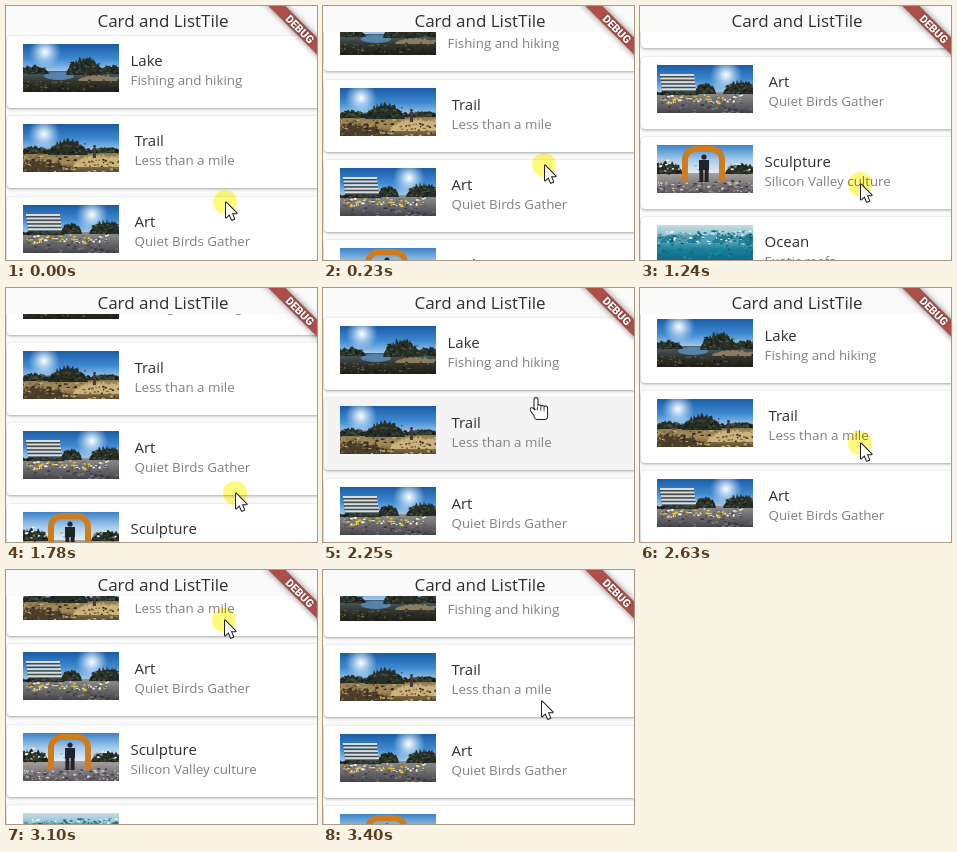
Animation, 311 px wide and 254 px high, one loop 3480 ms. Source, as an HTML page with a canvas:

```html
<!DOCTYPE html>
<html lang="en">
<head>
<meta charset="utf-8">
<title>Card and ListTile</title>
<style>
html, body { margin: 0; width: 100%; height: 100%; overflow: hidden; background: #fafafa; }
canvas { display: block; width: 311px; height: 254px; }
</style>
</head>
<body>
<canvas id="stage"></canvas>
<script>
const W = 311, H = 254, LOOP = 3480, BAR = 26;
const TOP = 30, PITCH = 80.3, CARD = 72, MAX_SCROLL = 140;
const FONT = '"Open Sans", "Noto Sans", sans-serif';
const canvas = document.getElementById('stage');
const dpr = window.devicePixelRatio || 1;
canvas.width = Math.round(W * dpr);
canvas.height = Math.round(H * dpr);
const ctx = canvas.getContext('2d');

const clamp = (v, lo, hi) => Math.max(lo, Math.min(hi, v));
const ease = u => u * u * (3 - 2 * u);

const ITEMS = [
  { title: 'Lake', sub: 'Fishing and hiking', x: 124.5, paint: lake },
  { title: 'Trail', sub: 'Less than a mile', x: 128.5, paint: trail },
  { title: 'Art', sub: 'Quiet Birds Gather', x: 128.5, paint: art },
  { title: 'Sculpture', sub: 'Silicon Valley culture', x: 124.5, paint: sculpture },
  { title: 'Ocean', sub: 'Exotic reefs', x: 124.5, paint: ocean }
];

const START = { x: 220, y: 196 };
const move = (until, x, y) => ({ until, x, y, press: false });
const drag = (until, x, y) => ({ until, x, y, press: true });
const GESTURES = [
  drag(480, 227, 55), drag(860, 227, 55), move(1200, 221, 180),
  drag(1575, 222, 120), drag(1934, 236, 260), move(2330, 210, 94),
  move(2560, 221, 162), drag(3060, 219, 45), move(3080, 219, 49), drag(3400, 219, 131)
];

// The screen refreshes about 13 times a second and rests twice.
function tick(t) {
  if (t < 860) return Math.min(480, Math.floor(t / 80) * 80);
  const step = 230 / 3, early = t < 2097, start = early ? 860 : 2100;
  return start + step * Math.min(early ? 14 : 17, Math.floor((t - start + 8) / step));
}

// Replays the gestures up to t; the list follows the pointer while it is pressed.
function stateAt(t) {
  let { x, y } = START, from = 0, scroll = 0;
  for (const g of GESTURES) {
    const u = ease(clamp((t - from) / (g.until - from), 0, 1));
    const dy = (g.y - y) * u;
    x += (g.x - x) * u;
    y += dy;
    if (g.press) scroll = clamp(scroll - dy, 0, MAX_SCROLL);
    if (t < g.until) return { x, y, scroll, press: g.press, hover: !g.press };
    from = g.until;
  }
  return { x, y, scroll, press: false, hover: false };
}

function rect(color, x, y, w, h) {
  ctx.fillStyle = color;
  ctx.fillRect(x, y, w, h);
}

function oval(color, x, y, rx, ry = rx) {
  ctx.fillStyle = color;
  ctx.beginPath();
  ctx.ellipse(x, y, rx, ry, 0, 0, 7);
  ctx.fill();
}

function text(str, x, y, size, color) {
  ctx.font = size + 'px ' + FONT;
  ctx.fillStyle = color;
  ctx.fillText(str, x, y);
}

function random(seed) {
  let s = seed * 7919;
  return () => (s = (s * 16807) % 2147483647) / 2147483647;
}

// Pictures are 96 by 48.
function fade(y, h, ...colors) {
  const g = ctx.createLinearGradient(0, y, 0, y + h);
  colors.forEach((c, i) => g.addColorStop(i / (colors.length - 1), c));
  rect(g, 0, y, 96, h);
}

function sky(sunX, sunY) {
  fade(0, 30, '#1a5ca6', '#3f8ad2', '#b9d8ef');
  const g = ctx.createRadialGradient(sunX, sunY, 0, sunX, sunY, 16);
  g.addColorStop(0, '#fff');
  g.addColorStop(0.25, 'rgba(235,246,255,.8)');
  g.addColorStop(1, 'rgba(200,228,250,0)');
  rect(g, 0, 0, 96, 30);
}

// A jagged arch: trees, rocks or waves.
function ridge(color, x, w, base, height, seed) {
  const rnd = random(seed);
  ctx.fillStyle = color;
  ctx.beginPath();
  ctx.moveTo(x, base);
  for (let i = 0; i <= w; i++) {
    ctx.lineTo(x + i, base - height * Math.sqrt(Math.sin(Math.PI * i / w) + 1e-6) * (0.7 + 0.4 * rnd()));
  }
  ctx.lineTo(x + w, base);
  ctx.fill();
}

function speckle(colors, n, x, y, w, h, seed) {
  const rnd = random(seed);
  for (let i = 0; i < n; i++) {
    oval(colors[i % colors.length], x + rnd() * w, y + rnd() * h, 0.6 + 1.5 * rnd(), 0.4 + 0.7 * rnd());
  }
}

function trees(x, w, base, height, seed) {
  ridge('#252d25', x, w, base, height, seed);
  speckle(['#4b513d', '#171d19', '#353d2f'], w * 1.5, x + 3, base - height * 0.7, w - 6, height * 0.7, seed);
}

function lake() {
  sky(22, 8);
  fade(27, 21, '#4e6472', '#33362f', '#1f1e18');
  oval('#5683aa', 36, 32, 15, 4);
  trees(-6, 32, 30, 9, 3);
  trees(43, 38, 31, 18, 5);
  trees(74, 30, 30, 9, 6);
  ridge('#8b7c60', 54, 50, 37, 6, 7);
  speckle(['#6f6246', '#1c1b16', '#3d3828'], 70, 0, 36, 96, 12, 8);
}

function trail() {
  sky(21, 10);
  fade(28, 20, '#8e7a50', '#a58b59', '#5b4a33');
  trees(-6, 36, 30, 8, 11);
  trees(25, 40, 31, 16, 12);
  trees(62, 40, 29, 6, 13);
  ridge('#cdb27c', 50, 60, 43, 13, 14);
  ridge('#4a3d2a', -20, 70, 48, 13, 15);
  speckle(['#2e281d', '#c0a573', '#75633f'], 110, 0, 32, 96, 16, 16);
  oval('#382b2a', 71.5, 22.5, 1.4);
  rect('#4a3838', 70, 24, 3, 10);
}

function art() {
  sky(69, 10);
  fade(27, 21, '#8f8f90', '#6d6d71', '#454549');
  trees(37, 22, 29, 12, 21);
  trees(66, 36, 29, 14, 22);
  for (let i = 0; i < 5; i++) {
    rect('#dedcd5', 3 + i / 2, 9 + i * 3.6, 34, 2);
    rect('#414a53', 3 + i / 2, 11 + i * 3.6, 34, 1.6);
  }
  trees(-4, 46, 30, 4, 23);
  speckle(['#eac02c', '#f0ede2', '#55555a'], 85, 4, 30, 82, 9, 24);
  speckle(['#38383c', '#77777b'], 40, 0, 40, 96, 8, 25);
}

function sculpture() {
  fade(0, 30, '#3b82c8', '#a5cceb', '#edf2f3');
  fade(28, 20, '#aaa39e', '#817d80', '#57565d');
  trees(-8, 34, 29, 13, 31);
  trees(68, 34, 29, 11, 32);
  speckle(['#f0f1ed', '#a9bcc9'], 40, 0, 15, 96, 12, 34);
  ctx.strokeStyle = '#cd7d20';
  ctx.lineWidth = 6;
  ctx.beginPath();
  ctx.roundRect(28, 4, 37, 50, 11);
  ctx.save();
  ctx.clip(new Path2D('M0 0H96V37H0Z'));
  ctx.stroke();
  ctx.restore();
  speckle(['#d4cdc4', '#45444b', '#8c878a'], 120, 0, 36, 96, 12, 33);
  oval('#22222a', 47, 12, 2.6);
  rect('#22222a', 42, 15, 10, 10);
  for (const side of [-1, 1]) rect('#22222a', 45 + side * 2.6, 24, 4, 13);
}

function ocean() {
  fade(0, 48, '#c3dce5', '#8cbccb', '#1b7f98', '#0d6888', '#08536f');
  for (let i = 0; i < 8; i++) ridge(i % 2 ? '#207f96' : '#539fb2', i * 13 - 10, 28, 18, 9, 41 + i);
  speckle(['#e8f3f5', '#2b8ba1', '#0d6079'], 120, 0, 6, 96, 14, 51);
  speckle(['#0c657c', '#1e8da2'], 90, 0, 18, 96, 30, 52);
}

function card(item, y, hover) {
  ctx.save();
  ctx.shadowColor = 'rgba(0,0,0,.34)';
  ctx.shadowBlur = 3 * dpr;
  ctx.shadowOffsetY = dpr;
  ctx.fillStyle = hover ? '#f4f4f4' : '#fff';
  ctx.beginPath();
  ctx.roundRect(1, y, 313, CARD, 4);
  ctx.fill();
  ctx.restore();

  ctx.save();
  ctx.translate(17, y + 8);
  ctx.beginPath();
  ctx.rect(0, 0, 96, 48);
  ctx.clip();
  item.paint();
  ctx.restore();

  text(item.title, item.x, y + 30, 15, '#303030');
  text(item.sub, item.x, y + 49, 13.35, '#808080');
}

function banner() {
  ctx.save();
  ctx.translate(318, -1);
  ctx.rotate(Math.PI / 4);
  ctx.shadowColor = 'rgba(0,0,0,.5)';
  ctx.shadowBlur = 6 * dpr;
  rect('#ad4f48', -44, 28, 88, 12);
  ctx.shadowBlur = 2 * dpr;
  ctx.font = '900 11px Roboto, sans-serif';
  ctx.textAlign = 'center';
  ctx.fillStyle = '#fff';
  ctx.fillText('DEBUG', 0, 38);
  ctx.restore();
}

function outline(path, width) {
  ctx.strokeStyle = '#1c1c1c';
  ctx.lineWidth = width;
  ctx.lineJoin = 'round';
  ctx.stroke(path);
  ctx.fillStyle = '#fff';
  ctx.fill(path);
}

const ARROW = new Path2D('M0 .5V15.5L3.5 12.3L5.9 17.8L8.2 16.8L5.9 11.3H10.6Z');

function handPath() {
  const path = new Path2D();
  for (let i = 0; i < 4; i++) path.roundRect(-1.5 + i * 3.2, i ? 6.5 + i * 0.7 : 0, 3, 11, 1.5);
  path.roundRect(-1.5, 11, 12.6, 10, 3);
  path.ellipse(-2.6, 13.6, 1.6, 4, -0.6, 0, 7);
  return path;
}
const HAND = handPath();

function pointer(x, y, press, hand) {
  ctx.save();
  if (press) {
    ctx.globalCompositeOperation = 'multiply';
    oval('#fff97c', x - 1, y, 12);
    ctx.globalCompositeOperation = 'source-over';
  }
  ctx.translate(x, y);
  outline(hand ? HAND : ARROW, 2);
  if (hand) for (let i = 1; i < 4; i++) rect('#1c1c1c', i * 3.2 - 1.9, 8 + i * 0.5, 0.7, 4);
  ctx.restore();
}

function draw(now) {
  const { x, y, scroll, press, hover } = stateAt(tick(now % LOOP));
  const px = Math.round(x), py = Math.round(y);
  let hand = false;

  ctx.setTransform(dpr, 0, 0, dpr, 0, 0);
  rect('#fafafa', 0, 0, W, H);
  ctx.save();
  ctx.beginPath();
  ctx.rect(0, BAR, W, H - BAR);
  ctx.clip();
  ITEMS.forEach((item, i) => {
    const top = Math.round(TOP + i * PITCH - scroll);
    const over = hover && py >= top && py < top + CARD;
    hand = hand || over;
    if (top < H && top + CARD > BAR) card(item, top, over);
  });
  ctx.restore();
  ctx.textAlign = 'center';
  text('Card and ListTile', 157, 21, 17, '#303030');
  ctx.textAlign = 'left';
  banner();
  pointer(px, py, press, hand);
}

function frame() {
  draw(performance.now());
  requestAnimationFrame(frame);
}
frame();
</script>
</body>
</html>
```
